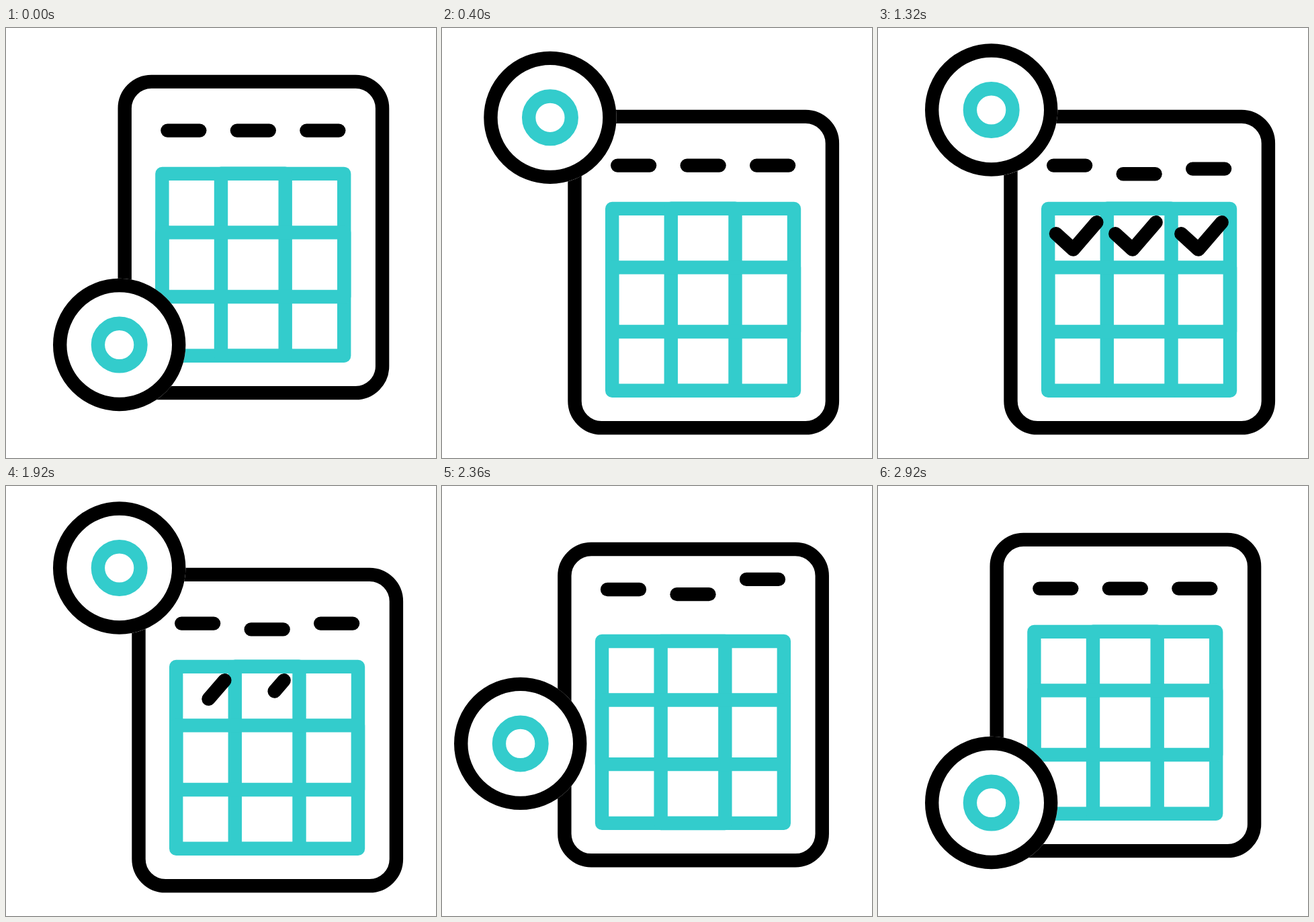
These frames come from a looping animation (640 by 640 pixels, 3000 ms). An HTML page:

```html
<!DOCTYPE html>
<html lang="en">
<head>
<meta charset="utf-8">
<title>Calendar checks</title>
<style>
  html, body { margin: 0; width: 100%; height: 100%; overflow: hidden; background: #fff; }
  svg { display: block; width: 100vw; height: 100vh; }
  .line { fill: none; stroke: #000; stroke-width: 20.4; stroke-linecap: round; stroke-linejoin: round; }
  .teal { stroke: #3cc; }
</style>
</head>
<body>
<svg viewBox="0 0 640 640">
  <path id="arc" fill="none" d="M168.7 471.5C84.3 383.1 84.3 240.8 168.7 122"/>
  <g id="card">
    <rect class="line" x="176.7" y="79.9" width="383.4" height="463.2" rx="39.8"/>
    <g class="line teal">
      <rect x="232.4" y="216.9" width="270.8" height="270.8"/>
      <rect x="320" y="216.7" width="95.7" height="271.2"/>
      <rect x="232.4" y="304.4" width="270.8" height="95.6"/>
    </g>
    <path class="line dash" d="M240.4 152.6h47.9"/>
    <path class="line dash" d="M343.9 152.6h47.9"/>
    <path class="line dash" d="M447.4 152.6h47.9"/>
  </g>
  <path class="line check" d="M265 306.2l25.6 23.4l34.7 -40.3"/>
  <path class="line check" d="M353.3 306.2l25.6 23.4l34.7 -40.3"/>
  <path class="line check" d="M451.3 306.2l25.6 23.4l34.7 -40.3"/>
  <g id="disc">
    <circle r="98.7" fill="#fff"/>
    <circle class="line" r="88.5"/>
    <circle class="line teal" r="31.8"/>
  </g>
</svg>
<script>
  const LOOP = 3000, STEP = 40;
  const card = document.getElementById('card');
  const disc = document.getElementById('disc');
  const arc = document.getElementById('arc');
  const dashes = [...document.querySelectorAll('.dash')];
  const checks = [...document.querySelectorAll('.check')];
  const arcLen = arc.getTotalLength();
  const checkLen = checks[0].getTotalLength();

  // keys: [time, value] pairs, eased between neighbours
  function track(keys, t) {
    if (t <= keys[0][0]) return keys[0][1];
    for (let i = 1; i < keys.length; i++) {
      const [t0, a] = keys[i - 1], [t1, b] = keys[i];
      if (t < t1) {
        const u = (t - t0) / (t1 - t0);
        return a + (b - a) * u * u * (3 - 2 * u);
      }
    }
    return keys[keys.length - 1][1];
  }

  const cardKeys = [[120, 0], [400, 1], [2176, 1], [2456, 0]];
  const discKeys = [[152, 0], [432, 1], [2176, 1], [2456, 0]];

  // each dash bounces down, up, down and rests, then the same backwards
  const bounce = [[0, 0], [240, 46], [440, -30.3], [720, 14.2], [920, 0]];
  const dashStart = [[400, 2000], [560, 1804], [480, 1920]];
  const dashKeys = dashStart.map(([there, back]) => [
    ...bounce.map(([t, y]) => [there + t, y]),
    ...bounce.map(([t, y]) => [back + 920 - t, y]).reverse()
  ]);

  const checkStart = [[640, 1764], [800, 1730], [720, 1620]];
  const span = (start, length) => [[start, 0], [start + length, 1]];

  function draw(t) {
    const k = track(cardKeys, t);
    card.setAttribute('transform', `translate(${20.8 * k} ${52 * k})`);

    const p = arc.getPointAtLength(arcLen * track(discKeys, t));
    disc.setAttribute('transform', `translate(${p.x} ${p.y})`);

    dashes.forEach((el, i) =>
      el.setAttribute('transform', `translate(0 ${track(dashKeys[i], t)})`));

    checks.forEach((el, i) => {
      const end = track(span(checkStart[i][0], 360), t) * checkLen;
      const start = track(span(checkStart[i][1], 280), t) * checkLen;
      el.style.visibility = end - start > 0.01 ? 'visible' : 'hidden';
      el.style.strokeDasharray = `${end - start} 500`;
      el.style.strokeDashoffset = -start;
    });
  }

  function tick() {
    const t = performance.now() % LOOP;
    draw(Math.floor(t / STEP) * STEP);
    requestAnimationFrame(tick);
  }
  tick();
</script>
</body>
</html>
```
